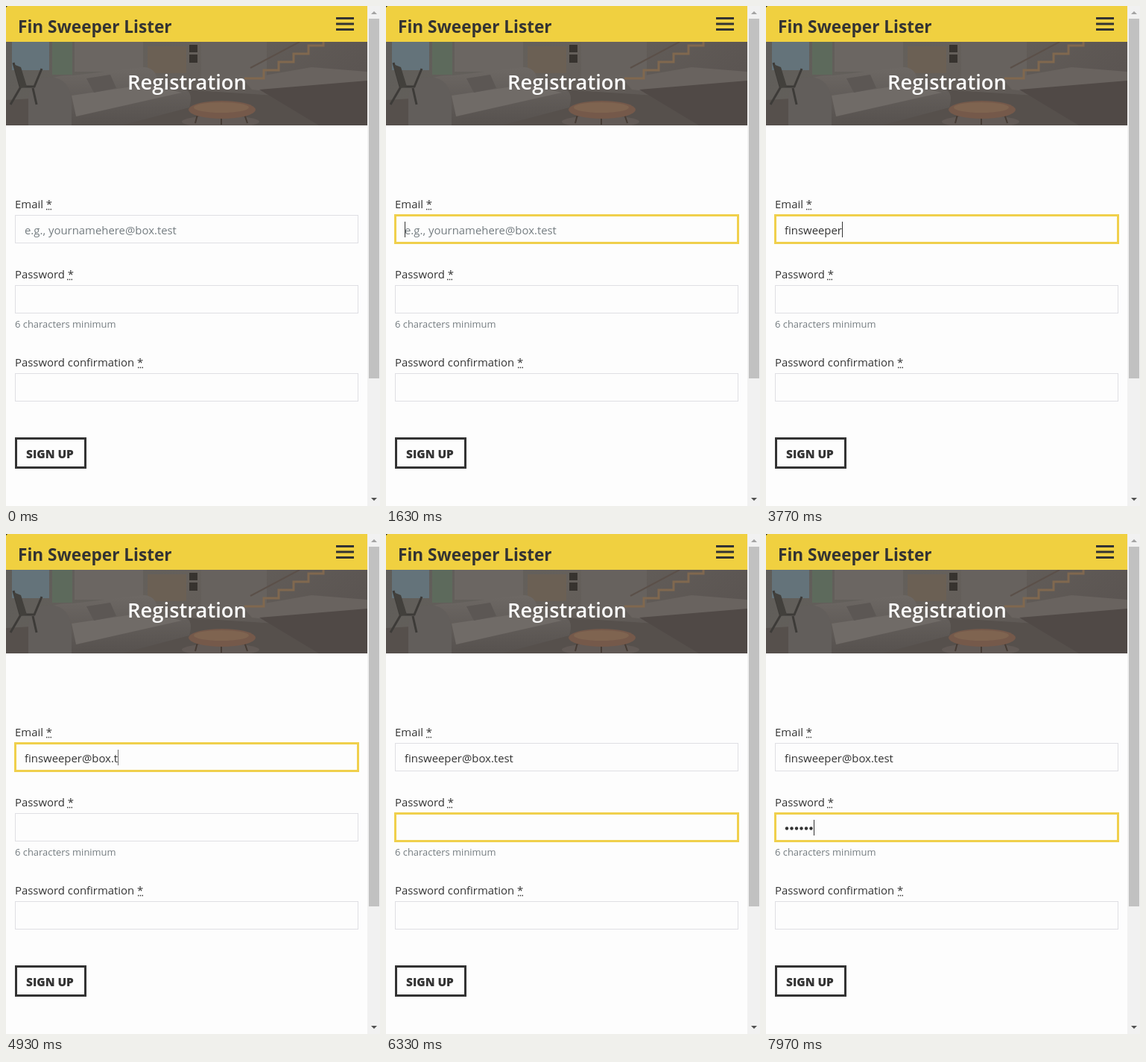
These frames come from a looping animation (502x670 px, 8000 ms). An HTML page:

```html
<!DOCTYPE html>
<html lang="en">
<head>
<meta charset="utf-8">
<title>Registration</title>
<style>
  html, body { margin: 0; width: 100%; height: 100%; overflow: hidden; background: #fdfdfd; }
  svg { display: block; width: 502px; height: 670px; font: 14.9px "Open Sans", "Noto Sans", sans-serif; fill: #333; }
  .brand { font-size: 22.6px; font-weight: 700; }
  .title { font-size: 27.4px; font-weight: 600; fill: #fdfdfd; text-anchor: middle; }
  .hint { font-size: 12.95px; fill: #747c80; }
  .placeholder { fill: #747c80; }
  .button { font-size: 15.4px; font-weight: 800; }
  .box { fill: #fdfdfd; stroke: #dfdfe4; }
  .box.focused { stroke: #f0d04c; stroke-width: 3; }
  .dots { stroke: #333; stroke-width: 1.4; stroke-dasharray: 1.4 1.4; }
</style>
</head>
<body>
<svg viewBox="0 0 502 670">
  <defs>
    <linearGradient id="room" x2="1" y2=".25">
      <stop stop-color="#5f5d59"/><stop offset=".5" stop-color="#65605b"/><stop offset="1" stop-color="#5b5552"/>
    </linearGradient>
    <linearGradient id="sofa" x2="0" y2="1">
      <stop stop-color="#6d6864"/><stop offset="1" stop-color="#56514e"/>
    </linearGradient>
    <clipPath id="hero"><path d="M0 48H485V160H0z"/></clipPath>
  </defs>
  <rect width="502" height="670" fill="#fdfdfd"/>

  <g clip-path="url(#hero)">
    <path fill="url(#room)" d="M0 48H486V160H0z"/>
    <path fill="#64737a" d="M8 48h50v38H8z"/>
    <path fill="#5d6a5c" d="M62 48h27v44H62z"/>
    <path fill="#6b6662" d="M92 48h92v40H92z"/>
    <path fill="#6b6054" d="M190 54h52v36H190z"/>
    <path fill="#37332f" d="M246 52h11v10h-11zM246 65h11v11h-11z"/>
    <path fill="#67625e" d="M262 48h88v54h-88z"/>
    <path fill="#56504c" d="M0 126L240 112 486 128V160H0z"/>
    <path fill="#69635f" d="M318 98L410 82 486 88V130L330 112z"/>
    <path fill="#504946" d="M340 112L486 100V160H420z"/>
    <path fill="none" stroke="#80684f" stroke-width="3" d="M320 97h26V86h20V75h20V64h20V53h20V46"/>
    <path fill="none" stroke="#5b5049" stroke-width="2" d="M328 83L394 48"/>
    <path fill="url(#sofa)" d="M48 106Q60 92 90 93L186 82Q200 83 203 98L240 111Q252 116 246 136L155 160H38z"/>
    <path fill="#625e5b" d="M30 122Q34 95 58 95 86 96 88 128V160H30z"/>
    <path fill="#706b67" d="M88 120L190 105 236 116 94 148z"/>
    <path fill="#5c5754" d="M108 97l32-5 8 18-30 6z"/>
    <path fill="none" stroke="#3d3b38" stroke-width="3" d="M10 76L19 108H38L48 84M20 108L6 132M36 110L41 132"/>
    <path fill="#42403c" d="M10 78L20 82 28 108 19 110z"/>
    <ellipse cx="288" cy="155" rx="52" ry="8" fill="#625a56"/>
    <path fill="none" stroke="#463b34" stroke-width="2" d="M258 142L254 157M319 142L324 157M289 147V159"/>
    <ellipse cx="290" cy="139" rx="45" ry="12" fill="#75594a"/>
    <ellipse cx="289" cy="136" rx="37" ry="7" fill="#7f6450"/>
  </g>
  <text class="title" x="243" y="112">Registration</text>

  <path fill="#f0d040" d="M0 0H485V48H0z"/>
  <path fill="#222" d="M0 0h2L0 2z"/>
  <text class="brand" x="16" y="36">Fin Sweeper Lister</text>
  <path stroke="#333" stroke-width="3" d="M443 16.5h24M443 24h24M443 31.5h24"/>

  <path fill="#f1f1f1" d="M485 0h17v670h-17z"/>
  <path fill="#c1c1c1" d="M487 17h14v482H487z"/>
  <path fill="#a3a3a3" d="M490 11l4-4 4 4z"/>
  <path fill="#505050" d="M490 659l4 4 4-4z"/>

  <text x="12" y="270.5">Email *</text>
  <text x="12" y="364.5">Password *</text>
  <text x="12" y="482.5">Password confirmation *</text>
  <path class="dots" d="M54 272.5h7M82 366.5h7M177 484.5h7"/>
  <rect class="box" id="emailBox" x="12.5" y="280.5" width="460" height="37"/>
  <rect class="box" id="passwordBox" x="12.5" y="374.5" width="460" height="37"/>
  <rect class="box" x="12.5" y="492.5" width="460" height="37"/>
  <text class="hint" x="12" y="431">6 characters minimum</text>

  <text class="placeholder" id="placeholder" x="25" y="306">e.g., yournamehere@box.test</text>
  <text id="email" x="25" y="306"></text>
  <g id="bullets"></g>
  <rect id="caret" width="1" height="21"/>

  <rect x="13.5" y="579.5" width="93" height="39" fill="#fdfdfd" stroke="#333" stroke-width="3"/>
  <text class="button" x="27" y="605.5">SIGN UP</text>
</svg>
<script>
  const LOOP = 8000, BLINK = 530;
  const ADDRESS = "finsweeper@box.test";
  const emailKeys = { focus: 1200, start: 1794, step: 206, count: ADDRESS.length };
  const passwordKeys = { focus: 5760, start: 6650, step: 230, count: 6 };
  const BULLET_STEP = 6.5;

  const byId = id => document.getElementById(id);
  const [emailBox, passwordBox, placeholder, email, bullets, caret] =
    ["emailBox", "passwordBox", "placeholder", "email", "bullets", "caret"].map(byId);

  for (let i = 0; i < passwordKeys.count; i++) {
    const dot = document.createElementNS(bullets.namespaceURI, "circle");
    dot.setAttribute("cx", 28 + i * BULLET_STEP);
    dot.setAttribute("cy", 394.5);
    dot.setAttribute("r", 2.2);
    bullets.append(dot);
  }

  const typedCount = (keys, t) =>
    Math.max(0, Math.min(keys.count, Math.floor((t - keys.start) / keys.step) + 1));

  function caretOpacity(keys, typed, t) {
    const lastEvent = typed ? keys.start + (typed - 1) * keys.step : keys.focus;
    const age = t - lastEvent;
    if (age % (2 * BLINK) >= BLINK) return 0;
    return Math.min(1, 0.4 + age / 160);
  }

  function draw(now) {
    const t = now % LOOP;
    const onPassword = t >= passwordKeys.focus;
    const onEmail = t >= emailKeys.focus && !onPassword;
    const letters = typedCount(emailKeys, t);
    const hidden = typedCount(passwordKeys, t);

    emailBox.classList.toggle("focused", onEmail);
    passwordBox.classList.toggle("focused", onPassword);
    placeholder.style.display = letters ? "none" : "";
    email.textContent = ADDRESS.slice(0, letters);
    [...bullets.children].forEach((dot, i) => dot.style.display = i < hidden ? "" : "none");

    const typedWidth = onPassword ? hidden * BULLET_STEP : letters && email.getComputedTextLength();
    caret.setAttribute("x", 25 + Math.round(typedWidth));
    caret.setAttribute("y", onPassword ? 383 : 289);
    caret.style.opacity = onPassword ? caretOpacity(passwordKeys, hidden, t)
      : onEmail ? caretOpacity(emailKeys, letters, t) : 0;
    requestAnimationFrame(draw);
  }
  requestAnimationFrame(draw);
</script>
</body>
</html>
```
